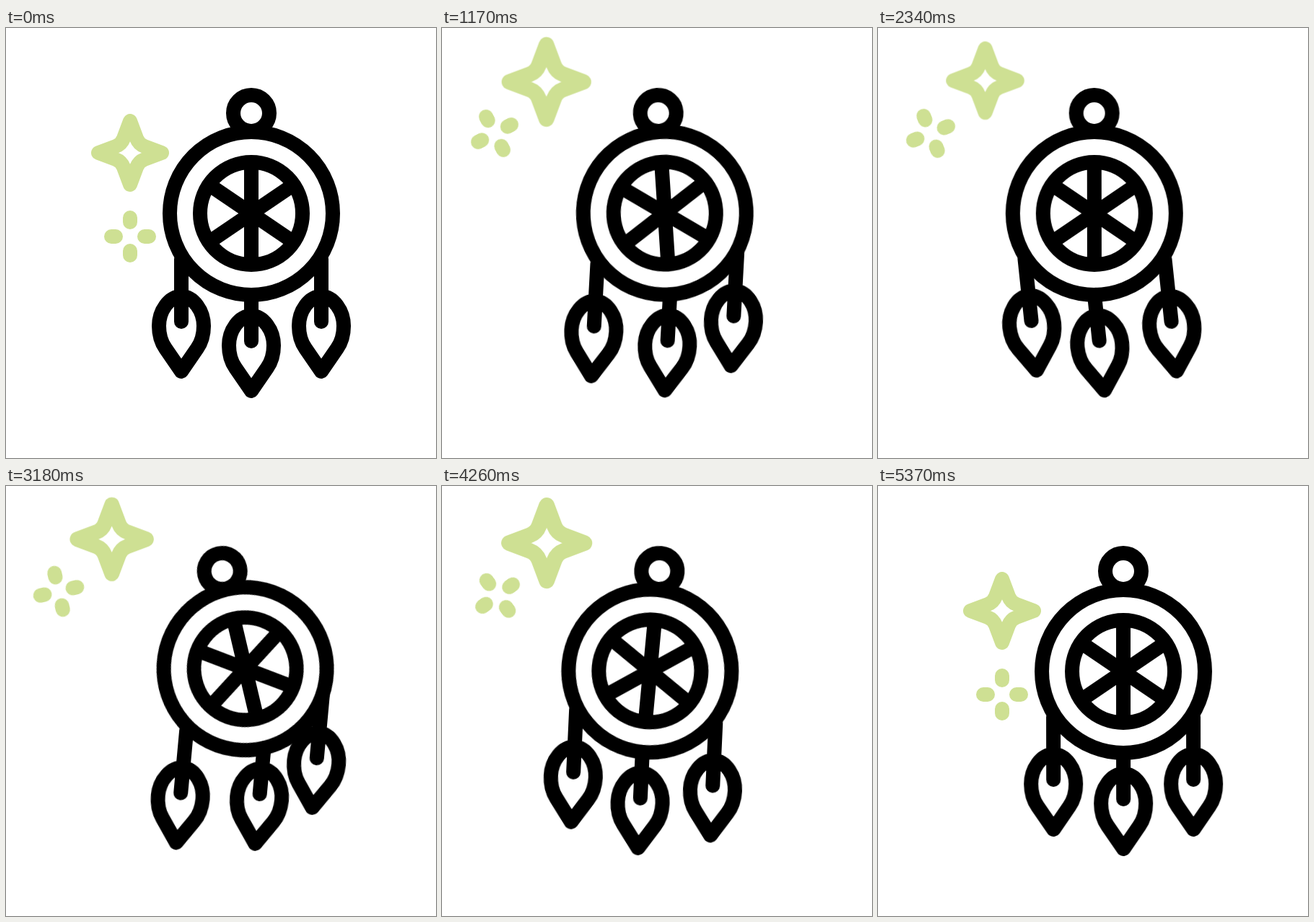
These frames come from a looping animation (596x596 px, 5400 ms). An HTML page:

```html
<!DOCTYPE html>
<html lang="en">
<head>
<meta charset="utf-8">
<title>Dreamcatcher</title>
<style>
  html, body { margin: 0; width: 100%; height: 100%; overflow: hidden; background: #fff; }
  svg { display: block; width: 100vw; height: 100vh; }
  svg * { fill: none; stroke-linecap: round; stroke-linejoin: round; }
  .catcher { stroke: #000; stroke-width: 20; }
  .sparkles { stroke: #cee093; stroke-width: 20; }

  .slide, .swing, .feather, .star, .star path, .drift, .spin {
    animation: 5400ms cubic-bezier(.3333, 0, .6667, 1) infinite;
  }
  .slide { animation-name: slide; }
  .swing { animation-name: swing; transform-origin: 340px 118px; }
  .feather { animation-name: dangle; transform-origin: 0 0; }
  .star { animation-name: star; }
  .star path { animation-name: weight; }
  .drift { animation-name: drift; }
  .spin { animation-name: spin; }

  @keyframes slide {
    0%, 91.11%, 100% { transform: translateX(0); }
    13.89%, 77.22% { transform: translateX(-40.3px); }
  }
  @keyframes swing {
    0%, 100% { transform: rotate(0deg); }
    14.44% { transform: rotate(-12.4deg); }
    34.44% { transform: rotate(16.6deg); }
    53.33% { transform: rotate(-19.8deg); }
    73.33% { transform: rotate(14.6deg); }
    85% { transform: rotate(-5.2deg); }
  }
  @keyframes dangle {
    0%, 100% { transform: rotate(0deg); }
    16.67% { transform: rotate(11deg); }
    36.67% { transform: rotate(-15.3deg); }
    56.67% { transform: rotate(20.5deg); }
    73.33% { transform: rotate(-19.8deg); }
    86.11% { transform: rotate(22.4deg); }
    91.67% { transform: rotate(-6deg); }
  }
  @keyframes star {
    0%, 91.11%, 100% { transform: translate(172px, 173px) scale(1); }
    13.89%, 73.33%, 77.22% { transform: translate(144px, 75px) scale(1.195); }
    46.67% { transform: translate(148.7px, 72.8px) scale(1); }
  }
  @keyframes weight {
    0%, 46.67%, 91.11%, 100% { stroke-width: 20px; }
    13.89%, 73.33%, 77.22% { stroke-width: 18.2px; }
  }
  @keyframes drift {
    0%, 91.11%, 100% { transform: translate(172px, 289px); }
    13.89%, 77.22% { transform: translate(73px, 146px); }
  }
  @keyframes spin {
    0%, 91.11%, 100% { transform: rotate(0deg); }
    13.89% { transform: rotate(55deg); }
    33.33% { transform: rotate(76deg); }
    53.33% { transform: rotate(60deg); }
    73.33%, 77.22% { transform: rotate(150deg); }
  }
</style>
</head>
<body>
<svg viewBox="0 0 596 596">
  <defs>
    <!-- teardrop, origin at the top of its outline -->
    <path id="drop" d="M0 104 L-22 72 C-29 62 -31 52 -31 41 C-31 20 -17 0 0 0 C17 0 31 20 31 41 C31 52 29 62 22 72 Z"/>
  </defs>

  <g class="sparkles">
    <g class="star">
      <path d="M0 -44 L9 -20 Q12 -12 20 -9 L44 0 L20 9 Q12 12 9 20 L0 44 L-9 20 Q-12 12 -20 9 L-44 0 L-20 -9 Q-12 -12 -9 -20 Z"/>
    </g>
    <g class="drift">
      <path class="spin" d="M0 -26 V-20 M26 0 H20 M0 26 V20 M-26 0 H-20"/>
    </g>
  </g>

  <g class="catcher slide">
    <g class="swing">
      <circle cx="340" cy="118" r="25"/>
      <circle cx="340" cy="257" r="113"/>
      <circle cx="340" cy="257" r="71"/>
      <path d="M340 188 V326 M284 219 L396 295 M396 219 L284 295"/>
      <!-- side feathers hang from the outer edge of the hoop -->
      <g transform="translate(237 315)">
        <g class="feather"><path d="M6 5 V92"/><use href="#drop" x="6" y="57"/></g>
      </g>
      <g transform="translate(340 370)">
        <g class="feather"><path d="M0 0 V64"/><use href="#drop" y="29"/></g>
      </g>
      <g transform="translate(443 315)">
        <g class="feather"><path d="M-6 5 V92"/><use href="#drop" x="-6" y="57"/></g>
      </g>
    </g>
  </g>
</svg>
</body>
</html>
```
